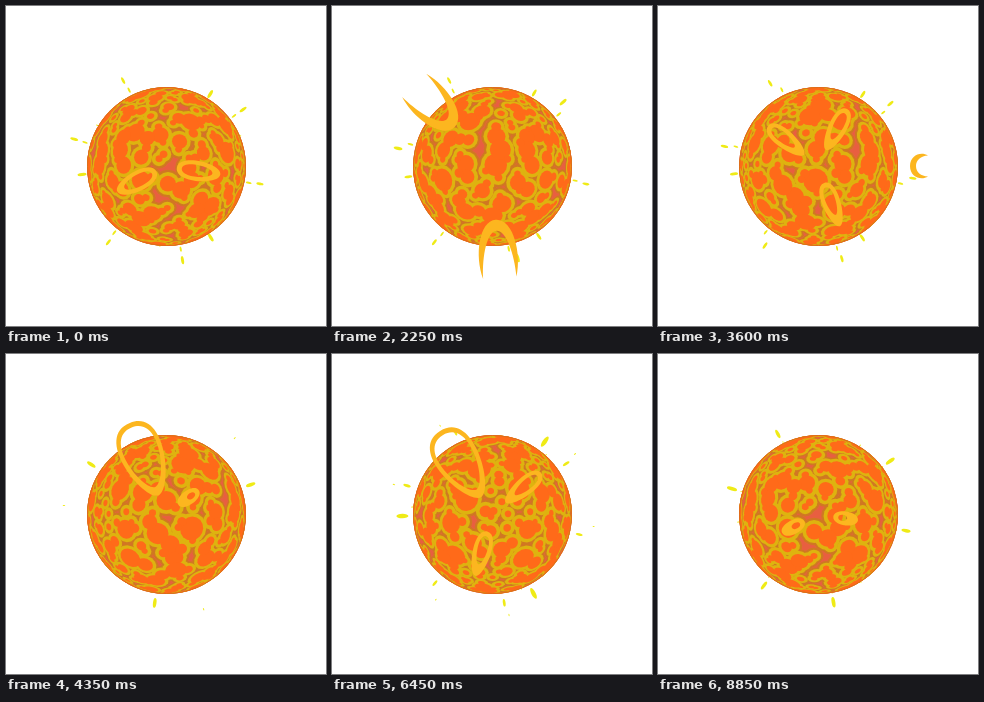
Recreate the animation shown at these times as an HTML page with a canvas. Size 320 by 320 pixels, loop 9 s.

```html
<!DOCTYPE html>
<html lang="en">
<head>
<meta charset="utf-8">
<title>Sun</title>
<style>
html, body { margin: 0; width: 100%; height: 100%; overflow: hidden; background: #fff; }
canvas { display: block; width: 320px; height: 320px; }
</style>
</head>
<body>
<canvas id="c" width="320" height="320"></canvas>
<script>
const ctx = document.getElementById('c').getContext('2d');
const STEP = 150, STEPS = 60, C = 160.5, R = 79.5;
const EYE = 3, ZOOM = Math.sqrt(EYE * EYE - 1); // perspective of the ball
const RAD = Math.PI / 180, TURN = Math.PI / STEPS;
const GOLD = '#fcb61f', LEMON = '#efeb16', RED = '#e85f40', RIM = '#de6a1c';
const LAYERS = [[0.055, '#d07822'], [0.034, '#deb30f'], [0, '#ff6a19']];

function seeded(s) {
  return () => {
    s = (s + 0x6d2b79f5) | 0;
    let t = Math.imul(s ^ (s >>> 15), 1 | s);
    t = (t + Math.imul(t ^ (t >>> 7), 61 | t)) ^ t;
    return ((t ^ (t >>> 14)) >>> 0) / 4294967296;
  };
}
const rnd = seeded(41);
const range = (a, b) => a + (b - a) * rnd();
const ageAt = (step, birth) => (step - birth + STEPS) % STEPS;

function disc(r) {
  ctx.beginPath();
  ctx.arc(C, C, r, 0, 7);
}

// ---- surface -------------------------------------------------------------
const spin = ([x, y, z], a) => {
  const c = Math.cos(a), s = Math.sin(a);
  return [x * c + z * s, y, z * c - x * s];
};
const project = ([x, y, z]) => {
  const k = R * ZOOM / (EYE - z);
  return [C + x * k, C + y * k];
};
function anywhere() {
  const y = range(-1, 1), a = range(0, Math.PI), h = Math.sqrt(1 - y * y);
  return [h * Math.cos(a), y, h * Math.sin(a)];
}
// the pattern repeats after half a turn
const gap = (a, b) => {
  const y = a[1] - b[1];
  return Math.min(Math.hypot(a[0] - b[0], y, a[2] - b[2]),
                  Math.hypot(a[0] + b[0], y, a[2] + b[2]));
};

// Blobs either melt into a neighbour or keep clear of it; large ones avoid the red pools.
const pools = Array.from({ length: 26 }, anywhere);
const blobs = [];
const TRIES = 9000;
for (let i = 0; i < TRIES; i++) {
  const p = anywhere();
  const r = 0.03 + 0.085 * Math.pow(1 - i / TRIES, 3) * range(0.5, 1);
  if (r > 0.036 && pools.some(q => gap(p, q) < r + 0.08)) continue;
  const crowded = blobs.some(b => {
    const d = gap(p, b.p), sum = r + b.r;
    return d < sum * 0.72 || (d > sum * 0.88 && d < sum + 0.04);
  });
  if (crowded) continue;
  const h = Math.hypot(p[0], p[2]), u = [-p[2] / h, 0, p[0] / h];
  const v = [p[1] * u[2], p[2] * u[0] - p[0] * u[2], -p[1] * u[0]];
  blobs.push({ p, r, u, v });
}

function drawBlob({ p, r, u, v }, turn) {
  if (spin(p, turn)[2] < 1 / EYE - 0.1) return;
  const sides = 16;
  ctx.beginPath();
  for (let i = 0; i < sides; i++) {
    const f = i / sides * Math.PI * 2, m = r * Math.cos(f), n = r * Math.sin(f);
    const q = p.map((k, j) => k + m * u[j] + n * v[j]);
    ctx.lineTo(...project(spin(q.map(k => k / Math.hypot(1, r)), turn)));
  }
  ctx.fill();
}

function drawBall(step) {
  ctx.save();
  disc(R);
  ctx.clip();
  ctx.fillStyle = RED;
  ctx.fillRect(0, 0, 320, 320);
  for (const [grow, color] of LAYERS) {
    ctx.fillStyle = color;
    for (const half of [0, Math.PI]) {
      for (const b of blobs) drawBlob({ ...b, r: b.r + grow }, step * TURN + half);
    }
  }
  ctx.restore();
  ctx.strokeStyle = RIM;
  disc(R - 0.5);
  ctx.stroke();
}

// ---- sparks: each vent fires every nine steps, in three directions ---------
const sparks = [];
function vent(angle, phase, size) {
  for (let birth = phase; birth < STEPS; birth += 9) {
    sparks.push({ angle: angle + range(-4, 4), birth, size: size * range(0.85, 1.15) });
  }
}
vent(-57, 5, 11);
vent(-37, 5, 7);
vent(13, 5, 8);
vent(-38, 3, 10);
vent(9, 3, 9);
vent(-50, 7, 11);
vent(-20, 0, 10);

function drawSparks(step) {
  ctx.fillStyle = LEMON;
  for (const { angle, birth, size } of sparks) {
    const age = ageAt(step, birth);
    if (age > 4) continue;
    const dist = 80 + 4 * age + 0.4 * age * age;
    const len = size * (0.25 + 0.75 * Math.sin(Math.PI * age / 4));
    for (let k = 0; k < 3; k++) {
      ctx.save();
      ctx.translate(160, 160);
      ctx.rotate((angle + k * 116.3) * RAD);
      ctx.beginPath();
      ctx.ellipse(dist, 0, len / 2, Math.max(0.5, len * 0.18), 0, 0, 7);
      ctx.fill();
      ctx.restore();
    }
  }
}

// ---- flares: birth step and the directions they leave in -------------------
const flares = [];
const flare = (birth, ...angles) => angles.forEach(angle => flares.push({ birth, angle }));
flare(59, 152, 9);
flare(11, 226, 86);
flare(19, 0);
flare(22, 219, -63, 70);
flare(29, -36);
flare(40, 238);
flare(41, -40, 105);
flare(46, 118);
flare(50, 188);
for (const birth of [4, 7, 16, 26, 36, 52]) flare(birth, range(0, 360));

// one life, step by step: distance, length, half width, root thickness
const LIFE = [
  [28, 25, 7, 11], [33, 44, 10, 8], [41, 46, 9, 12], [59, 78, 21, 9],
  [83, 58, 19, 11], [101, 18, 12, 6], [110, 5, 13, 1]
];

function ring(a, b, w, lean) {
  const c = w * (1.33 - lean), d = w * (1.33 + lean);
  ctx.moveTo(a, 0);
  ctx.bezierCurveTo(a, c, b, d, b, 0);
  ctx.bezierCurveTo(b, -d, a, -c, a, 0);
}

function horns(a, b, w, root) {
  const i = a + root, m = a + (b - a) * 0.6, tip = w * 0.88, n = w * 0.85;
  ctx.moveTo(b, tip);
  ctx.bezierCurveTo(m, w * 1.25, a, w * 0.9, a, 0);
  ctx.bezierCurveTo(a, -w * 0.9, m, -w * 1.25, b, -tip);
  ctx.bezierCurveTo(m, -n, i, -w * 0.5, i, 0);
  ctx.bezierCurveTo(i, w * 0.5, m, n, b, tip);
}

function drawFlares(step) {
  ctx.fillStyle = GOLD;
  for (const { birth, angle } of flares) {
    const age = ageAt(step, birth);
    if (age >= LIFE.length) continue;
    const [dist, len, w, root] = LIFE[age], a = -len / 2, b = len / 2;
    ctx.save();
    ctx.translate(160, 160);
    ctx.rotate(angle * RAD);
    ctx.translate(dist, 0);
    ctx.beginPath();
    if (age > 3) {
      horns(a, b, w, root);
    } else {
      if (Math.sin(angle * RAD) > 0) ctx.scale(-1, 1); // closed loops are thick at the bottom
      const lean = age * 0.2;
      ring(a, b, w, lean);
      ring(a + root, b - 5, w - Math.min(4, w * 0.6), lean);
    }
    ctx.fill('evenodd');
    ctx.restore();
  }
}

// ---- loop ----------------------------------------------------------------
let shown = -1;
function frame() {
  const step = Math.floor(performance.now() / STEP) % STEPS;
  if (step !== shown) {
    shown = step;
    ctx.fillStyle = '#fff';
    ctx.fillRect(0, 0, 320, 320);
    drawSparks(step);
    drawBall(step);
    drawFlares(step);
  }
  requestAnimationFrame(frame);
}
frame();
</script>
</body>
</html>
```
